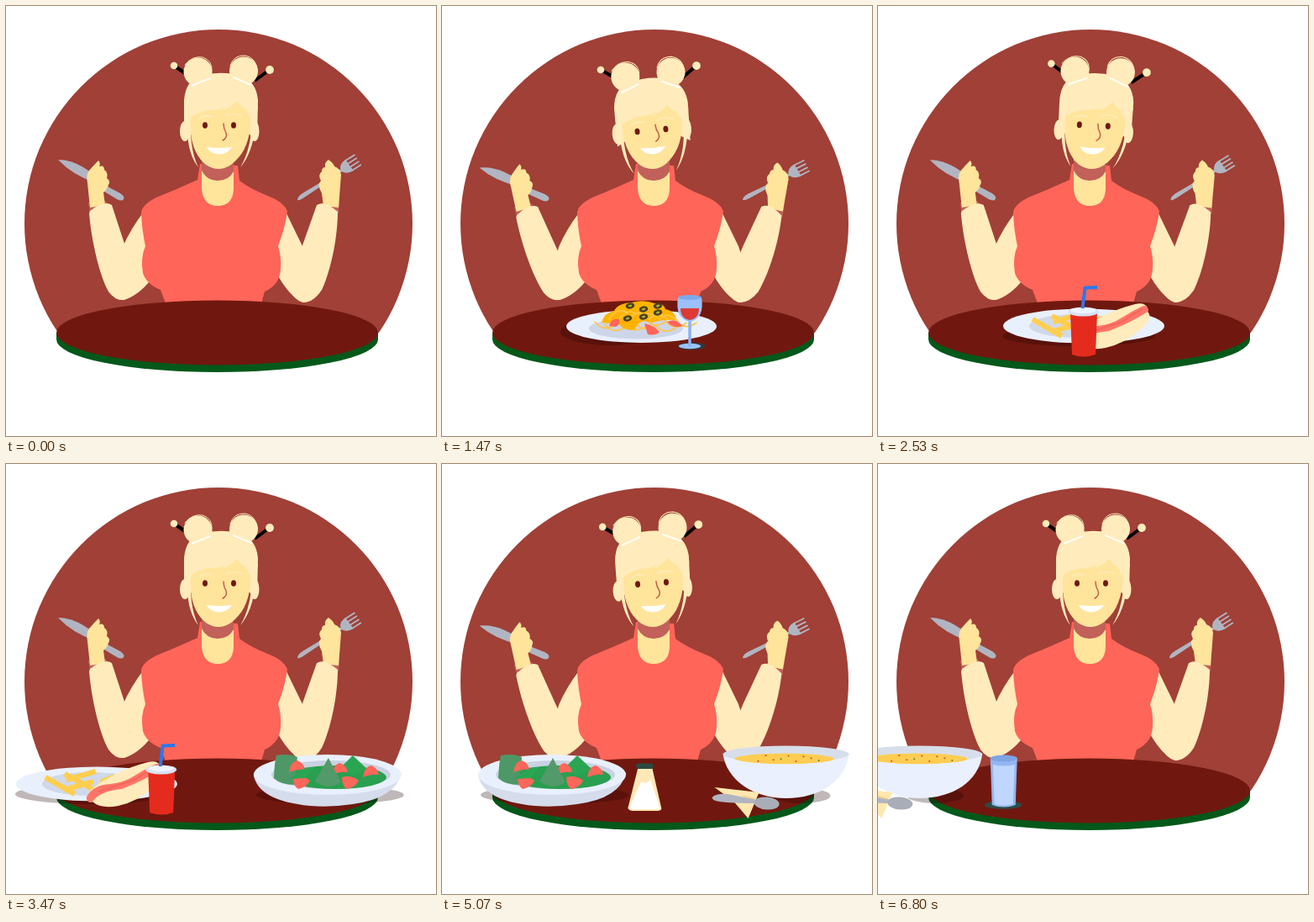
Recreate the animation shown at these times as an HTML page with a canvas. Size 512 by 512 pixels, loop 6830 ms.

```html
<!DOCTYPE html>
<html lang="en">
<head>
<meta charset="utf-8">
<title>Dinner</title>
<style>
html, body { margin: 0; width: 100%; height: 100%; overflow: hidden; background: #fff; }
canvas { display: block; width: 100vw; height: 100vh; }
</style>
</head>
<body>
<canvas id="c" width="512" height="512"></canvas>
<script>
const ctx = document.getElementById('c').getContext('2d');
const LOOP = 6830, CYCLE = 3260, STEP = 1630, TRAVEL = 372;
const SKIN = '#ffe49b', PALE = '#ffebbb', SHIRT = '#ff6558', BLUSH = '#c2605a',
  STEEL = '#b1b5c1', WINE = '#70180f', PLATE = '#e9f0fd', SHADE = 'rgba(30,0,0,.28)';

// drawing helpers
function fill(d, color) { ctx.fillStyle = color; ctx.fill(new Path2D(d)); }
function line(d, color, w, cap = 'round') {
  ctx.strokeStyle = color; ctx.lineWidth = w; ctx.lineCap = cap; ctx.lineJoin = 'round';
  ctx.stroke(new Path2D(d));
}
function oval(x, y, rx, ry, color, turn = 0) {
  ctx.fillStyle = color;
  ctx.beginPath(); ctx.ellipse(x, y, rx, ry, turn, 0, 7); ctx.fill();
}
function shifted(x, y, draw) { ctx.save(); ctx.translate(x, y); draw(); ctx.restore(); }
function turned(x, y, deg, draw) {
  ctx.save(); ctx.translate(x, y); ctx.rotate(deg * Math.PI / 180); ctx.translate(-x, -y);
  draw(); ctx.restore();
}

// timing helpers
const clamp = p => Math.min(1, Math.max(0, p));
const ease = p => (1 - Math.cos(Math.PI * clamp(p))) / 2;
function track(keys, t) {
  let [t0, v0] = keys[0];
  for (const [t1, v1] of keys) {
    if (t < t1) return v0 + (v1 - v0) * ease((t - t0) / (t1 - t0));
    t0 = t1; v0 = v1;
  }
  return v0;
}
const TILT = [[280, 0], [1000, -5], [1540, -5], [2700, 3.2], [2810, 3.2], [3260, 0]];
const REACH = [[280, 0], [1000, 1], [1810, 1], [2500, .13], [2810, .2], [3260, 0]];
const NOD = [[1100, 0], [1470, 1], [1800, 0]];

function backdrop() {
  ctx.save();
  ctx.beginPath(); ctx.rect(0, 0, 512, 389); ctx.clip();
  oval(253, 259, 231, 231, '#a04037');
  ctx.restore();
}

function table() {
  oval(251.5, 397, 191.5, 39, '#03581a');
  ctx.fillRect(60, 389, 383, 8);
  oval(251.5, 389, 191.5, 38.5, WINE);
}

function leftForearm() {
  fill('M98 234L118 232L125 239L100 247Z', BLUSH);
  fill('M104 206L136 223Q142 227 140 230Q138 233 132 230L104 213Z', STEEL);
  fill('M62 183Q77 183 92 192L110 204L106 210Q80 202 62 183Z', STEEL);
  fill('M100 240L97 211Q95 201 99 196Q105 189 110 184Q113 187 111 191Q117 189 117 195Q122 198 120 205Q125 208 122 213Q121 218 116 222L118 237Z', SKIN);
  fill('M126 237Q117 231 100 244L99 247C102 282 112 322 122 340Q130 351 140 350Q152 346 158 335L141 283Z', PALE);
}

function fork() {
  fill('M347 231Q347 227 353 223L378 208L379 212L355 228Q349 232 347 231Z', STEEL);
  line('M374 212L402 194', STEEL, 3);
  ctx.save();
  ctx.translate(400, 195); ctx.rotate(-.56);
  fill('M-1 -2Q2 -8 10 -8L11 8Q2 8 -1 2Z', STEEL);
  for (const y of [-7, -2.4, 2.4, 7]) line(`M9 ${y}L22 ${y}`, STEEL, 1.8);
  ctx.restore();
}

function rightForearm() {
  fill('M377 234L397 232L396 247L370 239Z', BLUSH);
  fork();
  fill('M378 238L376 223Q370 213 375 208Q371 201 376 197Q376 192 380 192Q379 186 384 183Q389 186 391 191Q398 193 399 201L396 240Z', SKIN);
  fill('M370 237Q379 231 395 245C395 272 388 312 376 338Q366 353 354 353Q342 350 337 336L353 285Z', PALE);
}

function torso() {
  fill('M164 245Q148 266 139 287L126 336Q130 351 140 350Q158 345 174 324L176 288Z', PALE);
  fill('M333 245L353 286L369 336Q366 352 354 353Q338 347 322 318L314 288Z', PALE);
}

function shirt() {
  fill('M231 188L228 207Q204 218 179 228Q161 237 161 247Q162 268 166 286Q160 299 163 318Q167 331 184 338L190 354H304L308 340Q326 332 327 313Q328 298 324 286Q333 262 335 244Q330 233 314 227Q291 218 278 208L276 190Z', SHIRT);
  fill('M233 180V218Q235 238 252 238Q270 238 271 218V180Z', SKIN);
  fill('M233 184H271V197Q265 208 252 208Q239 208 233 196Z', BLUSH);
}

function head(nod) {
  line('M203 73L213 80', '#000', 4, 'butt');
  line('M311 78L296 89', '#000', 4, 'butt');
  oval(200, 71, 4.3, 4.3, PALE);
  oval(314, 76, 4.9, 4.9, PALE);
  shifted(0, nod * 3.5, () => {
    oval(228.5, 78.5, 17, 17, PALE);
    oval(283, 77.5, 17, 17, PALE);
    line('M213 70Q222 59 234 61Q246 65 245 77', PALE, 1);
    line('M267 71Q271 58 285 59Q298 62 299 76', PALE, 1);
  });
  oval(213, 149, 6, 12, PALE);
  oval(296, 149, 5.5, 12, PALE);
  shifted(0, nod * 6, () => {
    fill('M212 158L212 112Q214 88 232 83Q254 77 276 82Q298 88 300 112L299 158L285 150H226Z', PALE);
  });
  fill('M220 118V150C221 168 229 182 238 189Q253 199 268 189C281 179 288 166 291 145V112Z', SKIN);
  shifted(0, nod * 6, () => {
    fill('M216 130L215 108Q240 84 272 90L298 106L294 136Q287 129 286 123Q279 120 275 113Q270 120 256 125Q260 122 261 120Q251 125 242 124Q229 126 221 132Z', PALE);
    line('M230 134Q237 129 246 132M262 131Q270 126 281 131', PALE, 1.6);
    line('M222 94.5L243 86M271 85L292 94', '#fffdf5', 2.2);
    oval(237, 142, 3, 3.8, WINE);
    oval(271, 142, 3, 3.8, WINE);
    fill('M212 120L221 126C218 152 221 176 229 192Q217 177 216 150Z', PALE);
    fill('M300 118L291 126Q293 150 290 163Q286 181 279 192Q293 176 297 144Z', PALE);
  });
  shifted(0, nod * 1.5, () => line('M259 140Q259 146 262 151Q264 157 258 160', '#bd5a45', 1.4));
  fill('M239 168Q254 170 269 168Q263 177 253 176.500Q243 176 239 168Z', '#fff');
}

function pasta() {
  oval(199, 388, 58, 16, SHADE);
  oval(237.5, 381.500, 89.5, 19.500, PLATE);
  oval(231, 384, 56, 12.5, '#cdd6e8');
  for (let i = 0; i < 9; i++) {
    const x = 182 + i * 12, y = 380 + 4 * Math.sin(i * 2.3);
    line(`M${x} ${y - 4}Q${x + 10} ${y + 9} ${x + 25} ${y - 1}`, '#ffc44a', 1.6);
  }
  fill('M190 377Q193 365 205 363Q209 354 226 353Q240 349 253 354Q264 353 266 361Q279 364 279 374Q263 373 250 377Q235 371 230 385Q218 388 211 379Z', '#ffb300');
  for (let i = 0; i < 6; i++) line(`M${199 + i * 12} 373q9 ${-15 + i} 22 ${-8 + i * 2}`, '#ffcb55', 1.3);
  for (const [x, y] of [[224, 357], [240, 361], [257, 357], [240, 370], [257, 365], [221, 372]]) {
    oval(x, y, 5.3, 3.6, '#45451f', -.2);
    oval(x, y, 2.3, 1.4, '#b9a33e', -.2);
  }
  fill('M199 381Q201 371 211 373Q212 380 207 382Z', SHIRT);
  fill('M241 378Q252 380 259 388Q255 393 245 391Z', SHIRT);
  fill('M268 376Q279 371 286 381Q276 385 268 376Z', SHIRT);
}

function wineGlass() {
  oval(297, 405, 16.5, 4.2, '#2f3c40');
  oval(295, 405, 13, 3.3, '#9cc3ff');
  line('M295 373V404', '#8bb3f5', 3.5);
  fill('M281 347Q277 372 295 376Q313 372 309 347Z', '#9bc0fb');
  fill('M284 360H306Q306 372 295 374Q284 372 284 360Z', '#dc3a35');
  oval(295, 347, 14, 3, '#7fa8ea');
}

function hotdogPlate() {
  oval(239, 393, 91, 12, SHADE);
  oval(245, 381, 96, 20.5, PLATE);
  oval(238, 381, 58, 14, '#d0d9e9');
  line('M184 373L219 393M209 376L244 366M206 388L241 378M207 369L240 387M250 379L267 372', '#ffce4f', 6.5, 'butt');
  fill('M237 389Q264 366 306 355Q318 352 321 360L252 394Z', PALE);
  line('M238 398Q244 387 262 386Q280 384 292 376T317 362', '#ff7468', 10);
  fill('M240 402Q250 389 275 387Q303 376 321 364Q328 371 314 384Q294 402 271 407Q250 411 240 402Z', PALE);
  line('M247 390Q258 387 266 384T282 379T298 371T315 361', '#f2665b', 2);
}

function soda() {
  fill('M229 365L231 415Q245 420 259 415L261 365Z', '#e52b1d');
  oval(244.5, 364, 18.5, 5.5, '#d8e2f3');
  oval(244.5, 362.5, 15, 3.6, '#eef4ff');
  line('M243.5 360L246.500 335.500L261 335', '#2c78ec', 4, 'butt');
}

function salad() {
  oval(248, 394, 88, 11, SHADE);
  fill('M157 370Q162 401 224 407Q249 409 275 405Q326 398 333 368Z', '#d5dcec');
  oval(245, 370, 88, 24, PLATE);
  oval(249, 370, 71, 17, '#c9d2e2');
  oval(255, 373, 60, 14, '#2a9f50');
  fill('M181 374Q182 354 184 347Q199 344 209 349L206 382Q189 382 181 374Z', '#4d9866');
  fill('M258 364L275 347L293 364L274 371Z', '#2aa653');
  for (const [x, y] of [[208, 361], [259, 364], [296, 367]]) {
    shifted(x, y, () => fill('M-9 6Q-7 -7 1 -8Q9 -5 10 3Q0 2 -9 6Z', '#ff665a'));
  }
  for (const [x, y] of [[214, 379], [272, 379]]) {
    shifted(x, y, () => fill('M-10 -6Q1 -9 10 -2Q6 6 -4 8Q-10 4 -10 -6Z', '#ff665a'));
  }
  fill('M246 350L230 378Q246 389 261 379Z', '#539a6b');
  fill('M202 375Q212 361 229 361Q225 370 217 374Z', '#2aa653');
}

function salt() {
  fill('M273 362L261 410Q263 413 267 413H296Q301 413 301 410L290 362Z', '#ffe8b8');
  fill('M277 378Q282 382 288 376L299 409Q299 411 295 411H267Q263 411 263 409Z', '#fff');
  ctx.fillStyle = '#2d4a41';
  ctx.beginPath(); ctx.roundRect(271, 356.5, 20, 6.5, 2); ctx.fill();
}

function soup() {
  oval(262, 395, 34, 9, SHADE);
  fill('M168 345C172 376 204 398 243 398C283 398 314 378 318 345Z', '#eaf0fd');
  oval(243, 345.500, 75, 10, '#d7deeb');
  ctx.save();
  ctx.beginPath(); ctx.ellipse(243, 345.500, 73, 12, 0, 0, 7); ctx.clip();
  oval(241, 351, 59, 6.5, '#ffcd52');
  ctx.restore();
  for (let i = 0; i < 9; i++) {
    oval(210 + i * 9, 350.5 + 3.6 * Math.sin(i * 2.4 + 2), 1, 1, i % 5 == 3 ? '#3d8a45' : '#d8402c');
  }
  fill('M158 385L211 391L198 422L181 402Z', '#ffe8b0');
  line('M192 395L205 399', '#f3cf83', 1.5);
  fill('M155 397Q160 392 174 393L209 400V404Q180 404 164 402Q155 401 155 397Z', STEEL);
  oval(220, 404, 15, 7.5, '#a9adb7', .08);
}

function waterGlass() {
  oval(267.5, 406, 22, 4.8, '#2c4c46');
  fill('M252 350L254 406Q268 411 282 406L284 350Z', '#92b7f2');
  fill('M255 358Q268 361 281 358L279 405Q268 408 257 405Z', '#bfd7ff');
  oval(268, 350.5, 16, 4, '#7ea4e2');
}

const courses = [[pasta, wineGlass], [hotdogPlate, soda], [salad, salt], [soup, waterGlass]];

// slides in from the right, rests, then leaves to the left
function slide(draw, t, inAt, inDur, outAt, outDur) {
  if (t > outAt + outDur) return;
  const x = TRAVEL * (1 - ease((t - inAt) / inDur) - ease((t - outAt) / outDur));
  shifted(x, 0, draw);
}

function frame(t) {
  const u = t % CYCLE, reach = track(REACH, u);
  ctx.fillStyle = '#fff';
  ctx.fillRect(0, 0, 512, 512);
  backdrop();
  torso();
  turned(139, 345, -6.4 * reach * reach, leftForearm);
  turned(354, 345, 5.5 * reach, rightForearm);
  shirt();
  turned(252, 200, track(TILT, u), () => head(track(NOD, t)));
  table();
  courses.forEach(([dish, extra], i) => {
    const inAt = i ? STEP * i - 139 : 250, outAt = STEP * i + 1544;
    slide(dish, t, inAt, 600, outAt, 715);
    slide(extra, t, inAt + 350, 600, outAt + 142, 590);
  });
}

const begin = performance.now();
function tick() {
  frame((performance.now() - begin) % LOOP);
  requestAnimationFrame(tick);
}
tick();
</script>
</body>
</html>
```
